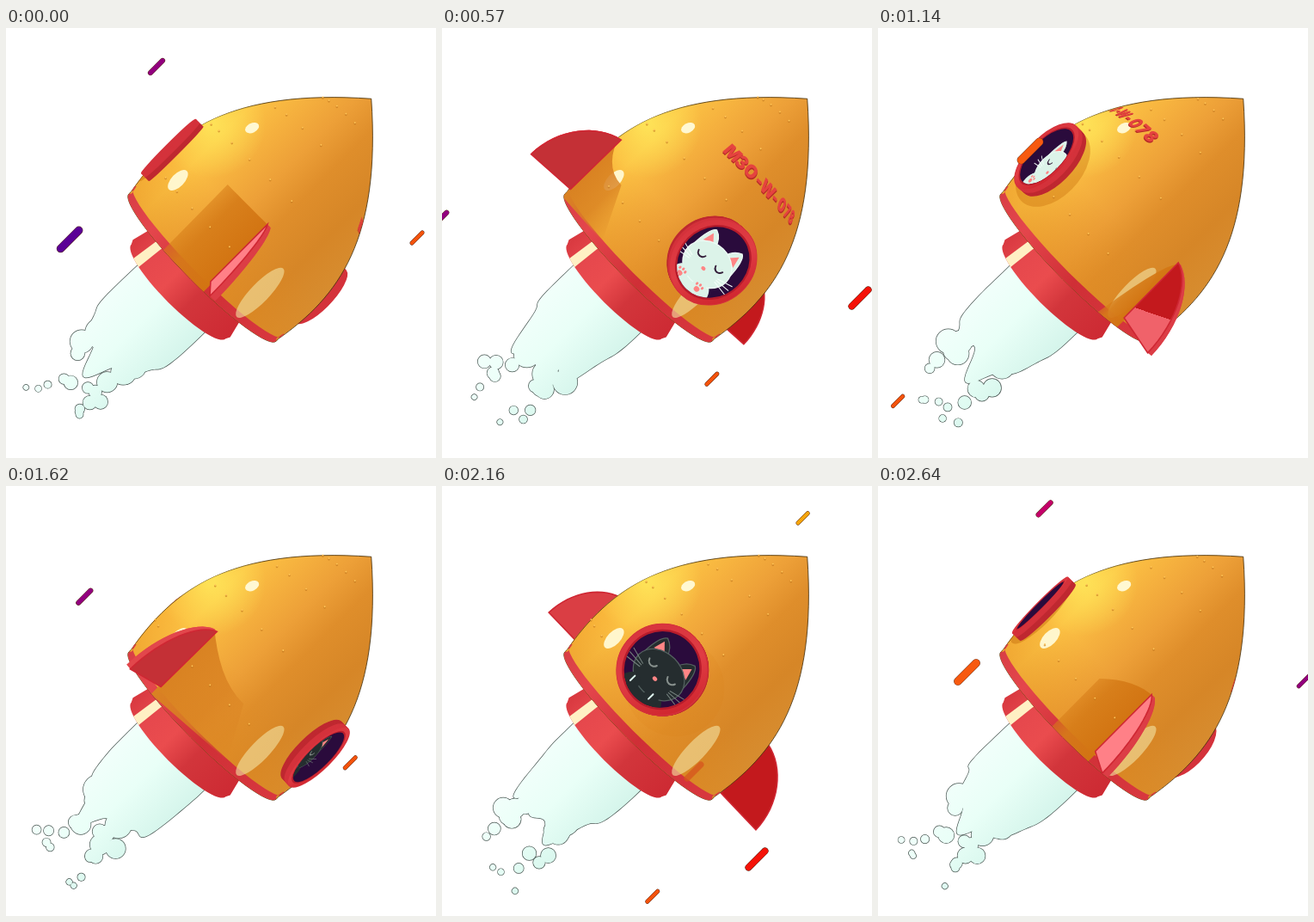
These frames come from a looping animation (500x500 px, 2670 ms). An HTML page with a canvas:

```html
<!DOCTYPE html>
<html lang="en">
<head>
<meta charset="utf-8">
<title>Cat rocket</title>
<style>
html, body { margin: 0; width: 100%; height: 100%; overflow: hidden; background: #fff; }
canvas { display: block; width: 500px; height: 500px; }
</style>
</head>
<body>
<canvas id="stage" width="500" height="500"></canvas>
<script>
const ctx = document.getElementById('stage').getContext('2d');
// One full spin takes a step longer than the loop shows.
const LOOP = 2670, STEP = 30, SPIN = LOOP + STEP, HALF = SPIN / 2;
const RAD = Math.PI / 180, TAU = Math.PI * 2;
const DEPTH = 640, EYE = -100;

// Rocket space: y runs down the axis, x across it, z towards the viewer.
function project(x, y, z) {
  const s = DEPTH / (DEPTH - z);
  return [x * s, EYE + (y - EYE) * s];
}
const polar = (r, deg, y) => project(r * Math.sin(deg * RAD), y, r * Math.cos(deg * RAD));

function trace(points) {
  ctx.beginPath();
  points.forEach(p => ctx.lineTo(p[0], p[1]));
  ctx.closePath();
}
function fillPath(points, color) {
  trace(points);
  ctx.fillStyle = color;
  ctx.fill();
}
function ellipse(x, y, rx, ry, color, turn = 0) {
  ctx.beginPath();
  ctx.ellipse(x, y, rx, ry, turn, 0, TAU);
  ctx.fillStyle = color;
  ctx.fill();
}
function line(color, width, ...pts) {
  ctx.beginPath();
  pts.forEach((p, i) => i ? ctx.lineTo(...p) : ctx.moveTo(...p));
  ctx.strokeStyle = color;
  ctx.lineWidth = width;
  ctx.stroke();
}
function ramp(x0, y0, x1, y1, ...stops) {
  const g = ctx.createLinearGradient(x0, y0, x1, y1);
  stops.forEach(([at, c]) => g.addColorStop(at, c));
  return g;
}
function arc3(r, y, from, to) {
  const pts = [];
  for (let i = 0; i <= 30; i++) pts.push(polar(r, from + (to - from) * i / 30, y));
  return pts;
}
// Draw on a plane touching the body at a given angle.
function onSurface(r, deg, y, lean, draw) {
  const sn = Math.sin(deg * RAD), cs = Math.cos(deg * RAD);
  const at = (a, b) => {
    const q = r + b * lean;
    return project(q * sn + a * cs, y + b, q * cs - a * sn);
  };
  const o = at(0, 0), ex = at(1, 0), ey = at(0, 1);
  ctx.save();
  ctx.transform(ex[0] - o[0], ex[1] - o[1], ey[0] - o[0], ey[1] - o[1], o[0], o[1]);
  draw();
  ctx.restore();
}
function random(seed) {
  const v = Math.sin(seed * 127.1 + 3.7) * 43758.5453;
  return v - Math.floor(v);
}
const wrap = deg => ((deg + 180) % 360 + 360) % 360 - 180;

function hullPath() {
  const rim = arc3(119, 0, -79, 79);
  ctx.beginPath();
  ctx.moveTo(121, 0);
  ctx.bezierCurveTo(136, -85, 124, -166, 0, -274);
  ctx.bezierCurveTo(-124, -166, -136, -85, -121, 0);
  rim.forEach(p => ctx.lineTo(...p));
  ctx.closePath();
}

function drawFlame(t) {
  const w = t / SPIN * TAU;
  const body = [];
  for (let i = 0; i <= 80; i++) {
    const a = Math.PI * i / 80;
    const wave = 1 + 0.1 * Math.sin(5 * a + 3 * w) + 0.08 * Math.sin(9 * a - 4 * w);
    body.push([55 * Math.cos(a) * (0.94 + 0.06 * wave) - 8 * Math.sin(a),
      52 + 118 * Math.pow(Math.sin(a), 0.6) * wave]);
  }
  const drops = [];
  for (let i = 0; i < 20; i++) {
    const p = (t / 900 + random(i)) % 1;
    const x = (random(i + 60) * 2 - 1) * 44 - 6 + 4 * Math.sin(p * 7 + i);
    drops.push([x, 140 + 108 * p, 3 + (8 + 10 * random(i + 140)) * Math.pow(1 - p, 1.3)]);
  }
  const skin = ramp(-60, 0, 60, 0, [0, '#f2fffb'], [0.45, '#e9fff7'], [1, '#d3f4ea']);
  trace(body);
  ctx.strokeStyle = '#4a5753';
  ctx.lineWidth = 1.4;
  ctx.stroke();
  drops.forEach(([x, y, r]) => ellipse(x, y, r + 0.7, r + 0.7, '#4a5753'));
  fillPath(body, skin);
  drops.forEach(([x, y, r]) => ellipse(x, y, r, r, skin));
}

function drawSkirt() {
  const low = arc3(77, 41, -83, 83);
  const shape = [[-73, 10], [-80, 38], ...low, [80, 38], [73, 10]];
  fillPath(shape, ramp(-80, 0, 80, 0, [0, '#d8383f'], [0.2, '#e6484d'], [0.4, '#ea4c4e'],
    [0.62, '#d2353b'], [1, '#cd2a33']));
  ctx.save();
  trace(shape);
  ctx.clip();
  fillPath([[-58, 10], [-48, 10], [-54, 66], [-65, 58]], '#fff0c4');
  ctx.restore();
}

function finPoints(deg) {
  const pts = [polar(121, deg, -12)];
  for (let i = 0; i <= 16; i++) {
    const u = i / 16, v = 1 - u;
    const mix = (a, b, c, d) => a * v * v * v + 3 * b * v * v * u + 3 * c * v * u * u + d * u * u * u;
    pts.push(polar(mix(120, 150, 175, 176), deg, mix(-88, -82, -50, -12)));
  }
  return pts;
}
function drawFin(deg) {
  const dir = deg > 0 ? 1 : -1;
  const near = finPoints(deg - dir), far = finPoints(deg + dir);
  const rim = deg > 0 ? '#dc3d46' : '#e2474c';
  fillPath(far, rim);
  for (let i = 1; i < near.length - 1; i++)
    fillPath([near[i], near[i + 1], far[i + 1], far[i]], rim);
  const base = deg < -70 ? '#da3e44' : deg < 0 ? '#c43036' : '#c3191d';
  // A gloss leaves the side face towards the tip as it turns away.
  const edge = deg < 0 ? 1 : Math.min(1, Math.max(0, (deg - 17) / 32));
  const top = near[1], tip = near[near.length - 1];
  fillPath(near, edge === 1 ? base
    : ramp(...top, ...tip, [edge, edge ? base : '#ff8087'], [edge, edge ? '#f0626a' : '#ff8087']));
  ctx.strokeStyle = '#cf2733';
  ctx.lineWidth = 1.6;
  ctx.stroke();
}
function finShadow(deg) {
  const left = deg > -12;
  const reach = left ? 0.45 * deg - 30 : 34;
  const drop = left ? Math.min(86, Math.max(0, (deg - 8) * 3)) : 30;
  const pts = [polar(121, deg, 0), polar(123, deg, -88)];
  for (let i = 1; i <= 8; i++) {
    const u = i / 8;
    pts.push(polar(123, deg + reach * u, -88 + drop * (left ? u * u : Math.sin(u * 1.6))));
  }
  pts.push(polar(121, deg + reach * (left ? 1 : 1.4), left ? 0 : -8));
  const a = pts[0][0], b = pts[pts.length - 1][0];
  fillPath(pts, left
    ? ramp(a, 0, b, 0, [0, '#d27412'], [0.7, '#d67c18e8'], [1, '#d67c1890'])
    : ramp(a, 0, b, 0, [0, '#d98222'], [0.5, '#d98222cc'], [1, '#d9822200']));
}

function drawCat(dark) {
  const fur = dark ? '#252d2f' : '#dcf3e9';
  const edge = dark ? '#53605f' : '#eefcf6';
  const ink = dark ? '#87908d' : '#35203c';
  const pink = '#ff8585';
  ctx.lineCap = 'round';
  ctx.save();
  ctx.translate(dark ? -1 : 3, 3);
  ellipse(0, 28, 24, 16, fur);
  for (const s of [-1, 1]) {
    ctx.beginPath();
    ctx.moveTo(s * 25, -3);
    ctx.quadraticCurveTo(s * 24, -23, s * 18, -26);
    ctx.quadraticCurveTo(s * 9, -23, s * 6, -13);
    ctx.fillStyle = fur;
    ctx.fill();
    ctx.strokeStyle = edge;
    ctx.lineWidth = 1;
    ctx.stroke();
    fillPath([[s * 21, -11], [s * 18, -22], [s * 11, -15]], pink);
  }
  ellipse(0, 3, 27, 21, edge);
  ellipse(0, 3, 26, 20, fur);
  for (const s of [-1, 1]) {
    ctx.beginPath();
    ctx.arc(s * 12, -3, 5, 0.3, Math.PI - 0.3);
    ctx.strokeStyle = ink;
    ctx.lineWidth = 1.6;
    ctx.stroke();
    for (let i = -1; i <= 1; i++)
      line(dark ? '#74807d' : '#f5fffb', 0.8, [s * 18, 8 + i * 2], [s * 34, 7 + i * 5]);
    ellipse(s * 12 - 2, 24, 8, 8, fur);
    if (dark) {
      line('#dff5ef', 1.6, [s * 12 - 3, 19], [s * 12 - 3, 25]);
    } else {
      ellipse(s * 12 - 2, 26, 3, 2.4, pink);
      for (let i = -1; i <= 1; i++) ellipse(s * 12 - 2 + i * 3.6, 21 + Math.abs(i), 1.3, 1.5, pink);
    }
  }
  ellipse(0, 8, 2.4, 1.8, pink);
  ctx.restore();
}

function drawWindow(deg, dark) {
  for (let r = 114; r <= 125; r++) {
    const tone = r < 120 ? '#bf2830' : '#d4323b';
    onSurface(r, deg, -69, 0, () => ellipse(0, 0, 43, 43, tone));
    ctx.strokeStyle = tone;
    ctx.lineWidth = 1.6;
    ctx.stroke();
  }
  if (Math.cos(deg * RAD) < 0.2) return;
  onSurface(125, deg, -69, 0, () => {
    ellipse(0, 0, 43, 43, ramp(-40, -20, 40, 20, [0, '#d8343d'], [0.5, '#e03c44'], [1, '#d0262f']));
    ellipse(0, 0, 38, 38, '#b71c2b');
    ellipse(0, 0, 36, 36, '#2a0b3c');
  });
  ctx.save();
  ctx.clip();
  onSurface(113, deg, -69, 0, () => {
    ctx.scale(1.06, 1.06);
    drawCat(dark);
  });
  ctx.restore();
}

function drawHull(windows, fins) {
  hullPath();
  ctx.fillStyle = ramp(-130, -60, 130, -60, [0, '#fab63a'], [0.14, '#fcc244'], [0.3, '#f5b03e'],
    [0.45, '#eda038'], [0.6, '#df8e2b'], [0.8, '#d68627'], [1, '#d78d30']);
  ctx.fill();
  ctx.strokeStyle = '#49320f';
  ctx.lineWidth = 0.8;
  ctx.stroke();
  ctx.save();
  hullPath();
  ctx.clip();
  const glow = ctx.createRadialGradient(-112, -122, 5, -112, -122, 64);
  glow.addColorStop(0, '#ffea5ccc');
  glow.addColorStop(1, '#ffea5c00');
  ellipse(-112, -122, 64, 64, glow);
  ctx.fillStyle = ramp(0, -70, 0, 20, [0, '#e08a2000'], [1, '#e08a2077']);
  ctx.fillRect(-130, -70, 260, 100);

  fillPath([...arc3(119, 1, -90, 90), ...arc3(121, -9, 90, -90)],
    ramp(-122, 0, 122, 0, [0, '#d83e45'], [0.2, '#e4464c'], [0.55, '#cf2f36'], [1, '#d8383f']));

  ellipse(-74, -152, 8.5, 5.5, '#fff8d2', -1.24);
  ellipse(-92, -48, 15, 7.5, '#fff6cc', -1.59);
  ellipse(68, -23, 39, 11, 'rgba(242,224,160,0.62)', -1.59);

  for (const d of windows)
    if (d < 0 && d > -90) onSurface(122, d + 9, -66, 0, () =>
      ellipse(0, 0, 48, 46, `rgba(205,120,20,${0.55 * -Math.sin(d * RAD)})`));
  fins.forEach(d => { if (Math.abs(d) < 70) finShadow(d); });
  ctx.restore();
}

function drawRivets(turn) {
  for (const [r, y, gap] of [[44, -231, 18], [77, -183, 20], [112, -120, 15], [125, -48, 12]])
    for (let a = 0; a < 360; a += gap) {
      const d = wrap(a + turn);
      if (d < -70 || d > 15 || (y > -60 && Math.abs(wrap(a)) % 90 > 60)) continue;
      const [x, v] = polar(r, d, y);
      ellipse(x + 0.5, v + 0.5, 1.3, 1.3, '#c0741c99');
      ellipse(x - 0.3, v - 0.4, 0.9, 0.9, '#ffc65a');
    }
}

function drawLabel(deg) {
  ctx.font = '900 18px Inter, "Open Sans", sans-serif';
  ctx.textAlign = 'center';
  ctx.textBaseline = 'middle';
  [...'M3O-W-078'].forEach((ch, i) => {
    const d = wrap(deg + (i - 4) * 7.6);
    if (Math.cos(d * RAD) < 0.14) return;
    onSurface(97, d, -157, 0.5, () => {
      ctx.fillStyle = '#b52a27';
      ctx.fillText(ch, 0.9, 1.2);
      ctx.fillStyle = '#e5433f';
      ctx.fillText(ch, 0, 0);
    });
  });
}

// x, time, x + y, speed, length, width, first colour, second colour, switch x
const streaks = [
  [175, 0, 220, 0.31, 20, 6, '#c4006a', '#92007f', 186],
  [177, 1140, 320, 0.49, 30, 9.5, '#f75a10', '#5b0096', 88],
  [478, 0, 722, 0.288, 17, 5, '#92007f', '#f4530c', 486],
  [366, 810, 800, 0.5, 27, 8, '#f51208', '#f51208', 0],
  [101, 810, 457, 0.236, 16, 5, '#f5a50c', '#f4530c', 300]
];
function drawStreak([x0, t0, sum, v, len, w, first, second, at], t) {
  ctx.lineCap = 'round';
  for (let k = -1; k <= 1; k++) {
    const x = x0 - v * (t % HALF - t0 + k * HALF), y = sum - x, h = len * 0.354;
    const ends = [[x - h, y + h], [x + h, y - h]];
    line('#5a2a1a', w, ...ends);
    line(x > at ? first : second, w - 0.9, ...ends);
  }
}

function draw(t) {
  const turn = 98 - t * 360 / SPIN;
  const windows = [wrap(turn), wrap(turn + 180)];
  const fins = [wrap(turn - 90), wrap(turn + 90)];
  const depth = d => Math.cos(d * RAD);
  const parts = [
    ...windows.map((d, i) => ({ d, show: () => drawWindow(d, i === 1), front: depth(d) > 0.04 })),
    ...fins.map(d => ({ d, show: () => drawFin(d), front: depth(d) > 0.24 }))
  ].sort((a, b) => depth(a.d) - depth(b.d));

  ctx.fillStyle = '#fff';
  ctx.fillRect(0, 0, 500, 500);
  drawStreak(streaks[4], t);

  ctx.save();
  ctx.translate(231, 276);
  ctx.rotate(Math.PI / 4);
  drawFlame(t);
  drawSkirt();
  parts.forEach(p => { if (!p.front) p.show(); });
  drawHull(windows, fins);
  drawRivets(turn);
  drawLabel(windows[0]);
  ctx.restore();

  const pass = t % HALF;
  if (pass > 720 && pass < 900) {
    const x = 293 - 0.3 * (pass - 810);
    line('rgba(214,84,30,0.75)', 7, [x - 8, 633 - x], [x + 8, 617 - x]);
  }

  ctx.save();
  ctx.translate(231, 276);
  ctx.rotate(Math.PI / 4);
  parts.forEach(p => { if (p.front) p.show(); });
  ctx.restore();
  streaks.slice(0, 4).forEach(s => drawStreak(s, t));
}

function tick() {
  draw(Math.floor(performance.now() % LOOP / STEP) * STEP);
  requestAnimationFrame(tick);
}
tick();
</script>
</body>
</html>
```
